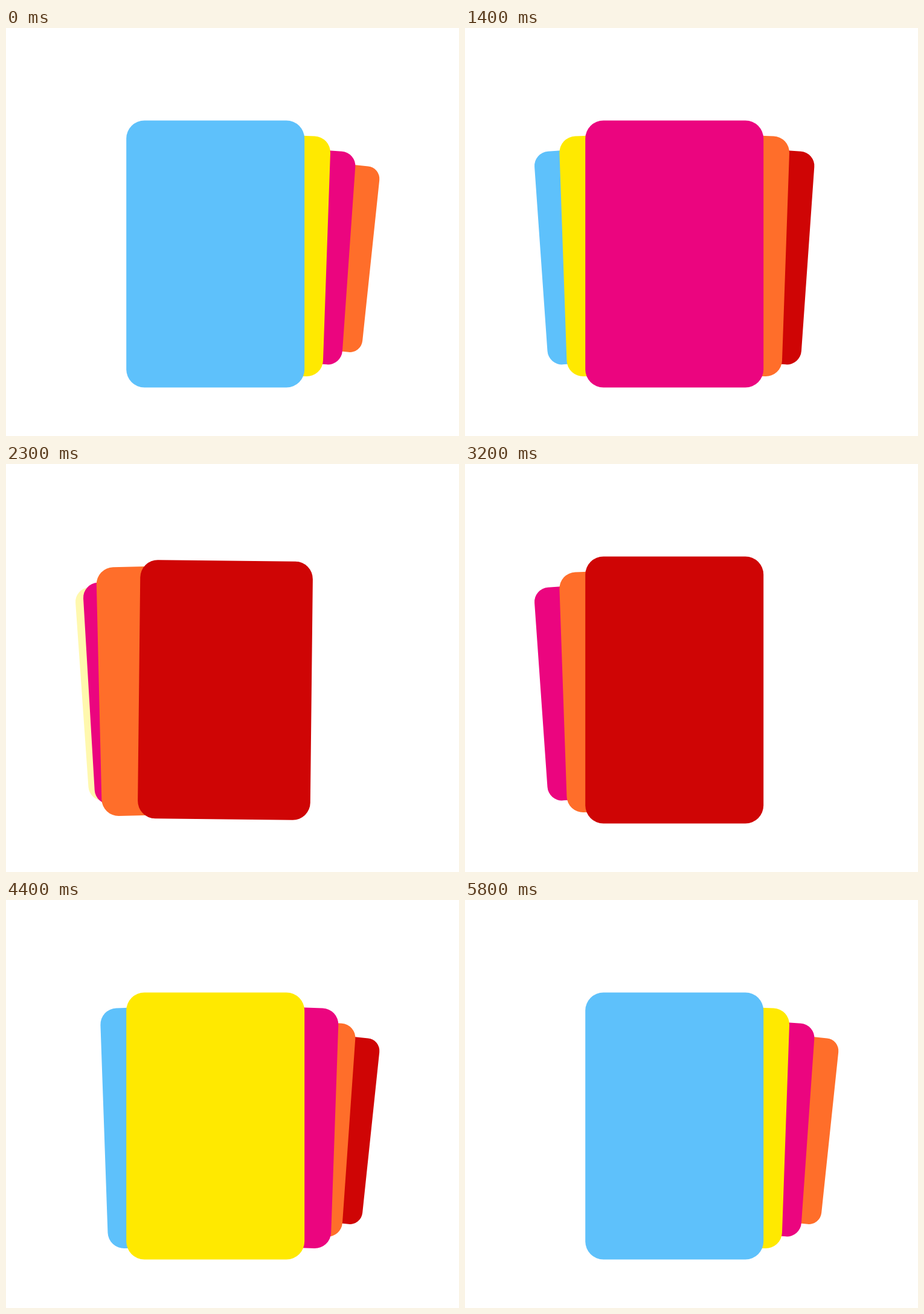
An HTML page with a canvas for the animation above (5900 ms loop, 750x677 px).

```html
<!DOCTYPE html>
<html lang="en">
<head>
<meta charset="utf-8">
<title>Card deck</title>
<style>
  html, body { margin: 0; width: 100%; height: 100%; overflow: hidden; background: #fff; }
  canvas { display: block; }
</style>
</head>
<body>
<canvas id="deck" width="750" height="677"></canvas>
<script>
const ctx = document.getElementById('deck').getContext('2d');
const LOOP = 5900, TICK = 100;
const CENTER = { x: 346.7, y: 375 };
const CARD = { w: 295, h: 443, r: 30 };
const SPACING = 51.6, SWING = 20;
const COLORS = ['#5ec1fb', '#ffe900', '#eb057f', '#ff6e2a', '#cf0505'];

// Swipes: start, duration, from card, to card
const SWIPES = [
  [150, 480, 0, 1], [800, 460, 1, 2], [1400, 460, 2, 3], [2000, 480, 3, 4],
  [3340, 350, 4, 3], [3800, 280, 3, 2], [4080, 320, 2, 1], [4530, 520, 1, 0]
];

const clamp = (v, lo, hi) => Math.min(hi, Math.max(lo, v));
const ease = u => u * u * (3 - 2 * u);

// Deck progress plus the sideways swing of each outgoing card
function pose(t) {
  let progress = 0;
  const swing = COLORS.map(() => 0);
  for (const [start, duration, from, to] of SWIPES) {
    const u = (t - start) / duration;
    progress += (to - from) * ease(clamp(u, 0, 1));
    swing[from] += (from - to) * SWING * Math.sin(Math.PI * clamp(u / 1.3, 0, 1));
  }
  return { progress, swing };
}

function drawCard(color, pos, swing) {
  // Cards beyond the visible range fade in place at its ends
  const p = clamp(pos, -2, 3);
  const alpha = 1 - Math.abs(pos - p);
  if (alpha < 0.001) return;
  const scale = 1 - 0.1 * Math.abs(p);
  ctx.save();
  ctx.globalAlpha = alpha;
  ctx.translate(CENTER.x + SPACING * p + swing, CENTER.y);
  ctx.rotate(p * 2 * Math.PI / 180);
  ctx.scale(scale, scale);
  ctx.fillStyle = color;
  ctx.beginPath();
  ctx.roundRect(-CARD.w / 2, -CARD.h / 2, CARD.w, CARD.h, CARD.r);
  ctx.fill();
  ctx.restore();
}

function draw(t) {
  const { progress, swing } = pose(t);
  ctx.fillStyle = '#fff';
  ctx.fillRect(0, 0, 750, 677);
  COLORS
    .map((color, i) => ({ color, pos: i - progress, swing: swing[i] }))
    .sort((a, b) => Math.abs(b.pos) - Math.abs(a.pos))
    .forEach(c => drawCard(c.color, c.pos, c.swing));
}

const begin = performance.now();
function frame() {
  const t = (performance.now() - begin) % LOOP;
  draw(Math.floor(t / TICK) * TICK);
  requestAnimationFrame(frame);
}
frame();
</script>
</body>
</html>
```
